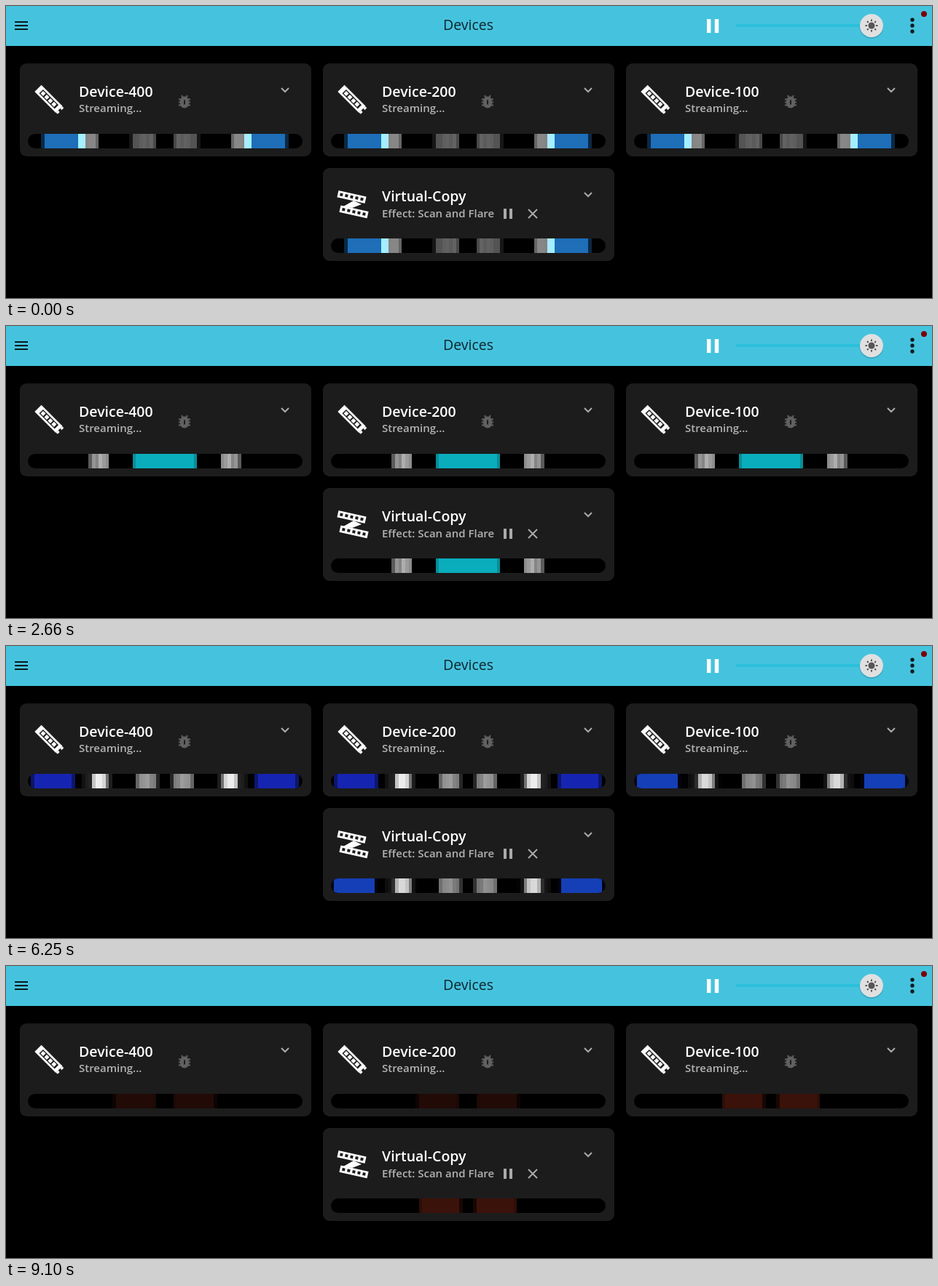
These frames come from a looping animation (1271x402 px, 9170 ms). An HTML page with a canvas:

```html
<!DOCTYPE html>
<html lang="en">
<head>
<meta charset="utf-8">
<title>Devices</title>
<style>
html, body { margin: 0; width: 100%; height: 100%; overflow: hidden; background: #000; }
svg, canvas { position: absolute; left: 0; top: 0; display: block; }
text { font-family: "Open Sans", "Noto Sans", sans-serif; }
.name { font-size: 19.5px; font-weight: 600; fill: #fff; }
.sub { font-size: 15px; font-weight: 600; fill: #b3b3b3; }
.line { fill: none; stroke: #aaa; stroke-width: 2; }
</style>
</head>
<body>
<svg id="ui" width="1271" height="402" viewBox="0 0 1271 402"></svg>
<canvas id="bars" width="1271" height="402"></canvas>
<script>
const LOOP = 9170, STEP = 76.3, LAST = 119;
const LEDS = 81, MID = 40, BAR_W = 377, BAR_H = 20;

const cards = [
  { x: 19, y: 79, name: 'Device-400' },
  { x: 435, y: 79, name: 'Device-200' },
  { x: 851, y: 79, name: 'Device-100' },
  { x: 435, y: 223, name: 'Virtual-Copy', virtual: true },
];

// ---- static interface ----
const rect = (x, y, w, h, fill) =>
  `<rect x="${x}" y="${y}" width="${w}" height="${h}" fill="${fill}"/>`;
const dot = (x, y, r, fill) => `<circle cx="${x}" cy="${y}" r="${r}" fill="${fill}"/>`;
const repeat = (n, draw) => Array.from({ length: n }, (_, i) => draw(i)).join('');

const stripIcon = `<g transform="translate(40.5 50) rotate(45)">
  ${rect(-22, -6.5, 41, 13, '#fff')}${rect(19, -6, 3, 4, '#fff')}${rect(19, 2, 3, 4, '#fff')}
  ${rect(-16, -3.8, 30, 7.6, '#1c1c1c')}
  ${repeat(4, i => rect(-14.5 + i * 7, -2.5, 5, 5, '#fff'))}</g>`;

const film = (x, y) => `<g transform="translate(${x} ${y}) rotate(12.5)">
  ${rect(0, 0, 39, 9.5, '#fff')}${repeat(5, i => rect(3 + i * 7.2, 2.7, 4, 4, '#1c1c1c'))}</g>`;

const copyIcon = film(21.5, 31) + film(24.5, 51.5) +
  '<path d="M28 53 42 45 53 50 40 55z" fill="#fff"/>';

const bug = `<path transform="translate(214 40.5)" fill="#606060" fill-rule="evenodd"
  d="M20 8h-2.8a6 6 0 0 0-1.8-2L17 4.4 15.6 3l-2.2 2.2a6 6 0 0 0-2.8 0L8.4 3 7 4.4 8.6 6a6
  6 0 0 0-1.8 2H4v2h2.1L6 12H4v2h2l.1 2H4v2h2.8a6 6 0 0 0 10.4 0H20v-2h-2.1l.1-2h2v-2h-2
  l-.1-2H20zM11 10h2v6h-2z"/>`;

const controls = rect(248, 56, 4, 14, '#aaa') + rect(256, 56, 4, 14, '#aaa') +
  '<path class="line" d="M282 57 294 69M294 57 282 69"/>';

const card = c => `<g transform="translate(${c.x} ${c.y})">
  <rect width="400" height="128" rx="9" fill="#1c1c1c"/>
  ${c.virtual ? copyIcon + controls : stripIcon + bug}
  <text class="name" x="81" y="46">${c.name}</text>
  <text class="sub" x="81" y="${c.virtual ? 68 : 67}">${c.virtual ? 'Effect: Scan and Flare' : 'Streaming...'}</text>
  <path class="line" d="M359 34 364 39 369 34"/></g>`;

const sun = dot(1188, 27, 4.5, '#555') + repeat(8, i =>
  `<rect x="1187" y="18.5" width="2" height="2.5" fill="#555" transform="rotate(${i * 45} 1188 27)"/>`);

document.getElementById('ui').innerHTML =
  rect(0, 0, 1271, 55, '#45c3de') +
  repeat(3, i => rect(12, 21 + i * 5, 18, 2, '#0b1a1e')) +
  '<text x="634.5" y="33" text-anchor="middle" font-size="19.5" fill="#10242c">Devices</text>' +
  rect(962, 18, 5.4, 19, '#fff') + rect(972.8, 18, 5.4, 19, '#fff') +
  '<rect x="1002" y="25" width="186" height="4" rx="2" fill="#2bbfdb"/>' +
  dot(1188, 28.5, 16.5, '#0002') + dot(1188, 27, 16, '#e0e0e0') + sun +
  repeat(3, i => dot(1244, 19 + i * 8, 2.7, '#0b1a1e')) +
  dot(1260, 11, 4, '#7a0008') + cards.map(card).join('');

// ---- light strips: times in steps, positions in LEDs ----
const SCAN_W = 12.2, SCAN_MAX = 34.4, FADE = 13;

// The scan bounces between centre and edge, turning round at these times.
const turns = [-9.5, -2.8, 18, 25.3, 36, 47.4, 55.7, 67.2, 75, 82.3, 90.1, 97.4, 126.4];

// On each beat the scan drops a flare that spreads and fades.
const beats = [-8.3, -5.1, 6, 20.2, 30, 37.6, 41.7, 51, 57.9, 59.7, 61.8, 70.5, 76.1, 79.1,
  84.6, 90.2, 92.4, 101];

// time, hue, saturation, lightness
const tones = [
  [0, 209, 72, 42], [15, 20, 90, 0], [19, 121, 80, 0], [23, 121, 80, 27], [47, 248, 100, 50],
  [64, 120, 100, 58], [82, 234, 78, 39], [93, 24, 100, 57], [94, 48, 60, 16],
  [116, 9, 65, 0], [119, 9, 65, 8], [121, 9, 85, 30],
];

const clamp01 = v => Math.min(1, Math.max(0, v));
const cover = (i, a, b) => clamp01(Math.min(i + 1, b) - Math.max(i, a));
const grain = (i, seed) => {
  const n = Math.sin(i * 12.99 + seed * 7.23) * 43758.5;
  return .84 + .28 * (n - Math.floor(n));
};

function scanAt(t) {
  const n = turns.findIndex(turn => turn > t);
  const f = (t - turns[n - 1]) / (turns[n] - turns[n - 1]);
  return SCAN_MAX * (n % 2 ? 1 - f : f);
}

function toneAt(t) {
  const n = tones.findIndex(tone => tone[0] > t);
  const [a, b] = [tones[n - 1], tones[n]], f = (t - a[0]) / (b[0] - a[0]);
  const [h, s, l] = a.slice(1).map((v, i) => v + (b[i + 1] - v) * f);
  return `hsl(${h} ${s}% ${l}%)`;
}

const ctx = document.getElementById('bars').getContext('2d');

function drawBar(bar, k) {
  const { x, y } = cards[bar], left = x + 11, top = y + 97;
  // The last two strips drift half a step ahead late in the loop.
  const t = bar > 1 && k > 80 ? k + .5 : k;
  const start = scanAt(t), tone = toneAt(t);
  const edge = i => left + Math.floor(i * BAR_W / LEDS);
  const live = beats.filter(b => t >= b && t < b + FADE);

  const fill = (i, style, alpha) => {
    ctx.fillStyle = style;
    ctx.globalAlpha = clamp01(alpha);
    for (const led of [i, LEDS - 1 - i].slice(i === MID))
      ctx.fillRect(edge(led), top, edge(led + 1) - edge(led), BAR_H);
  };

  ctx.save();
  ctx.beginPath();
  ctx.roundRect(left, top, BAR_W, BAR_H, 10);
  ctx.clip();
  ctx.fillRect(left, top, BAR_W, BAR_H);
  ctx.globalCompositeOperation = 'lighter';
  for (let i = 0; i <= MID; i++) {
    fill(i, tone, cover(i, start, start + SCAN_W));
    for (const beat of live) {
      const age = t - beat, centre = scanAt(beat) + SCAN_W / 2, half = 1.5 + age / 4;
      fill(i, '#fff', cover(i, centre - half, centre + half) * (1 - age / FADE) * grain(i, beat));
    }
  }
  ctx.restore();
}

function frame() {
  const t = performance.now() % LOOP;
  const k = Math.min(LAST, Math.floor((t + 26) / STEP));
  ctx.clearRect(0, 0, 1271, 402);
  cards.forEach((_, bar) => drawBar(bar, k));
  requestAnimationFrame(frame);
}
frame();
</script>
</body>
</html>
```
